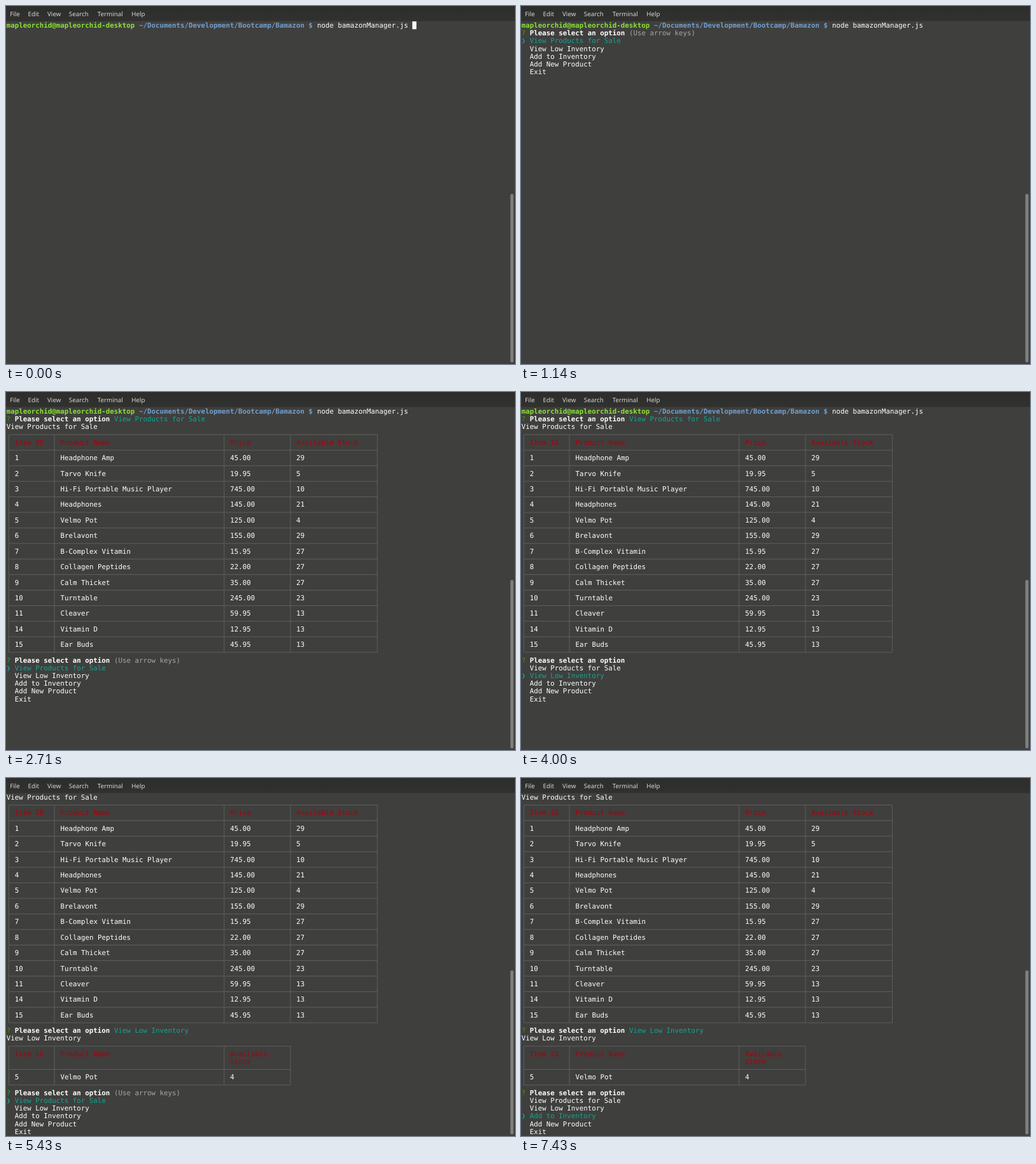
An HTML page for the animation above (8 s loop, 800 px wide and 562 px high).

```html
<!DOCTYPE html>
<html lang="en">
<head>
<meta charset="utf-8">
<title>Store manager terminal</title>
<style>
  html, body { margin: 0; width: 100%; height: 100%; overflow: hidden; background: #3f3f3d; }
  svg { display: block; width: 800px; height: 562px; }
  text { text-rendering: geometricPrecision; }
  #menubar text { font: 9.77px "Noto Sans", sans-serif; fill: #d6d6d0; }
  #screen text { font: 10.81px "DejaVu Sans Mono", "DejaVu Sans", monospace; fill: #fff; }
  #screen .bold { font-weight: bold; }
  #screen .user { font-weight: bold; fill: #8ae234; }
  #screen .path { font-weight: bold; fill: #729fcf; }
  #screen .mark { fill: #4e9a06; }
  #screen .pick { fill: #12a594; }
  #screen .head { fill: #a8000c; }
  #screen .hint { fill: #a6a6a4; }
  #screen path { fill: none; stroke: #636361; stroke-width: .9; }
</style>
</head>
<body>
<svg viewBox="0 0 800 562">
  <defs>
    <linearGradient id="bar" x2="0" y2="1">
      <stop offset="0" stop-color="#2d2d2b"/>
      <stop offset="1" stop-color="#31312f"/>
    </linearGradient>
  </defs>
  <rect width="800" height="562" fill="#3f3f3d"/>
  <rect width="800" height="23.7" fill="url(#bar)"/>
  <g id="menubar">
    <text x="6.2" y="15.5">File</text>
    <text x="34.6" y="15.5">Edit</text>
    <text x="65" y="15.5">View</text>
    <text x="98.8" y="15.5">Search</text>
    <text x="143.8" y="15.5">Terminal</text>
    <text x="197.2" y="15.5">Help</text>
  </g>
  <g id="screen"></g>
  <rect id="thumb" x="792.7" width="5" rx="2.4" fill="#7f7f7d"/>
</svg>
<script>
const LOOP = 8000;
const CELL_W = 6.508, CELL_H = 12.206, LEFT = 0.8, TOP = 24.2;
const screenEl = document.getElementById('screen');
const thumb = document.getElementById('thumb');

const OPTIONS = ['View Products for Sale', 'View Low Inventory', 'Add to Inventory',
  'Add New Product', 'Exit'];
const HEADS = ['Item ID', 'Product Name', 'Price', 'Available Stock'];
const PRODUCTS = [
  '1|Headphone Amp|45.00|29', '2|Tarvo Knife|19.95|5',
  '3|Hi-Fi Portable Music Player|745.00|10', '4|Headphones|145.00|21',
  '5|Velmo Pot|125.00|4', '6|Brelavont|155.00|29',
  '7|B-Complex Vitamin|15.95|27', '8|Collagen Peptides|22.00|27',
  '9|Calm Thicket|35.00|27', '10|Turntable|245.00|23',
  '11|Cleaver|59.95|13', '14|Vitamin D|12.95|13', '15|Ear Buds|45.95|13'
].map(line => line.split('|'));

const colX = col => LEFT + col * CELL_W;
const rowY = row => TOP + row * CELL_H;

const put = (row, col, str, cls = '') =>
  `<text class="${cls}" x="${colX(col)}" y="${rowY(row) + 9.8}">${str}</text>`;

const cursor = (row, col) =>
  `<rect x="${colX(col)}" y="${rowY(row)}" width="${CELL_W}" height="${CELL_H}" fill="#fff"/>`;

// Borders run through the middle of their character cells.
function grid(cols, rows) {
  const xs = cols.map(c => colX(c) + 3.65), ys = rows.map(r => rowY(r) + 6.1);
  const across = ys.map(y => `M${xs[0]} ${y}H${xs.at(-1)}`);
  const down = xs.map(x => `M${x} ${ys[0]}V${ys.at(-1)}`);
  return `<path d="${across.join('')}${down.join('')}"/>`;
}

const cells = (row, values, cls) =>
  values.map((v, i) => put(row, [2, 13, 54, 70][i], v, cls)).join('');

const command = () =>
  put(0, 0, 'mapleorchid@mapleorchid-desktop', 'user') +
  put(0, 32, '~/Documents/Development/Bootcamp/Bamazon $', 'path') +
  put(0, 75, 'node bamazonManager.js');

const question = row =>
  put(row, 0, '?', 'mark') + put(row, 2, 'Please select an option', 'bold');

const answer = (row, option) =>
  question(row) + put(row, 26, option, 'pick') + put(row + 1, 0, option);

function menu(row, chosen, hint) {
  const list = OPTIONS.map((o, i) => put(row + 1 + i, 2, o, i === chosen ? 'pick' : ''));
  return question(row) + (hint ? put(row, 26, '(Use arrow keys)', 'hint') : '') +
    list.join('') + put(row + 1 + chosen, 0, '❯', 'pick');
}

function stockTable(row) {
  const lines = Array.from({ length: PRODUCTS.length + 2 }, (_, i) => row + 2 * i);
  return grid([0, 11, 52, 68, 89], lines) + cells(row + 1, HEADS, 'head') +
    PRODUCTS.map((p, i) => cells(row + 3 + 2 * i, p)).join('');
}

function lowTable(row) {
  const [id, name, , stock] = PRODUCTS[4];
  return grid([0, 11, 52, 68], [row, row + 3, row + 5]) +
    cells(row + 1, ['Item ID', 'Product Name', 'Available'], 'head') +
    put(row + 2, 54, 'Stock', 'head') + cells(row + 4, [id, name, stock]);
}

const listed = (chosen, hint) =>
  command() + answer(1, OPTIONS[0]) + stockTable(3) + menu(32, chosen, hint);

const scrolled = (chosen, hint) =>
  put(0, 0, OPTIONS[0]) + stockTable(1) + answer(30, OPTIONS[1]) +
  lowTable(32) + menu(38, chosen, hint);

const STEPS = [
  [0, () => command() + cursor(0, 98)],
  [140, command],
  [710, () => command() + cursor(1, 0)],
  [1000, () => command() + menu(1, 0, true)],
  [2710, () => listed(0, true)],
  [4000, () => listed(1, false)],
  [5430, () => scrolled(0, true)],
  [7140, () => scrolled(1, false)],
  [7430, () => scrolled(2, false)]
];

let shown = -1;
function render(time) {
  const step = STEPS.findLastIndex(([start]) => time >= start);
  if (step === shown) return;
  shown = step;
  screenEl.innerHTML = STEPS[step][1]();
  const y = time >= 5430 ? 302 : 295;
  thumb.setAttribute('y', y);
  thumb.setAttribute('height', 559.6 - y);
}

const begin = performance.now();
function tick() {
  render((performance.now() - begin) % LOOP);
  requestAnimationFrame(tick);
}
tick();
</script>
</body>
</html>
```
